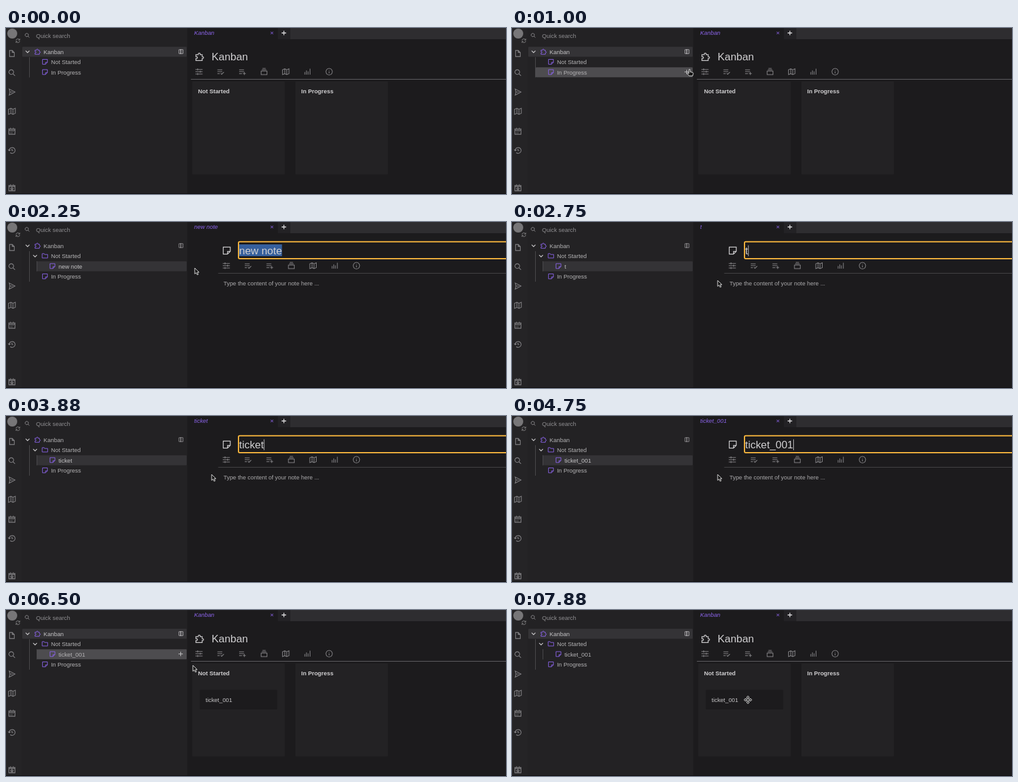
An HTML page for the animation above (8000 ms loop, 800 by 267 pixels).

```html
<!DOCTYPE html>
<html lang="en">
<head>
<meta charset="utf-8">
<title>Kanban notes</title>
<style>
  html, body { margin: 0; width: 100%; height: 100%; overflow: hidden; background: #1c1b1d; }
  svg { display: block; width: 800px; height: 267px; }
  text { font-family: "Liberation Sans", Arial, sans-serif; font-size: 9.4px; white-space: pre; }
</style>
</head>
<body>
<svg id="stage" viewBox="0 0 800 267"></svg>
<script>
const LOOP = 8000;
const PURPLE = '#8a63e8', DIM = '#858487', TEXT = '#b4b3b5', LIGHT = '#d0cfd1';
const PANEL = '#232224', PAGE = '#1c1b1d', ACTIVE = '#343336', HOVER = '#4d4c4f';

// Icon outlines on a 24 unit grid
const ICONS = {
  file: 'M13 3H5v18h14V9zV9h6',
  search: 'M10 3a7 7 0 1 0 .1 0zM15 15l6 6',
  send: 'M4 3l17 9-17 9 2-9zM6 12h8',
  map: 'M2 6l7-3 6 3 7-3v15l-7 3-6-3-7 3zM9 3v15M15 6v15',
  calendar: 'M3 5h18v16H3zM3 9h18M8 2v4M16 2v4M7 13h2M11 13h2M15 13h2M7 17h2M11 17h2',
  history: 'M4 12a8.7 8.7 0 1 1 3 6.5M1 9l3 4 4-3M12 7v5h4',
  star: 'M3 5h18v16H3zM3 8h18M8 2v4M16 2v4M12 11l1 2.5 3 .3-2 2 .5 2.7-2.5-1.3-2.5 1.3.5-2.7-2-2 3-.3z',
  puzzle: 'M3 7h6V5.500a2.500 2.500 0 0 1 5 0V7h5v5h1a2.500 2.500 0 0 1 0 5h-1v5H3v-5h1.500a2.500 2.500 0 0 0 0-5H3z',
  note: 'M3 3h18v11l-7 7H3zM21 14h-7v7',
  folder: 'M2 4h7l2 3h11v13H2z',
  door: 'M4 4h7v16H4zM11 2v20M11 4h9v16h-9M15 12h1',
  sliders: 'M1 5h22M1 12h22M1 19h22M8 2v6M16 9v6M8 16v6',
  check: 'M2 6h15M2 12h15M2 18h7M12 17l3 3 7-7',
  add: 'M2 6h15M2 12h15M2 18h9M18 13v9M13.500 17.500h9',
  stack: 'M3 10h18v11H3zM5 6h14M7 2h10',
  bars: 'M4 13v8M9 8v13M14 11v10M20 3v18',
  info: 'M12 2a10 10 0 1 0 .1 0zM12 11v6M12 7v1.500',
  sync: 'M4 11a8 8 0 0 1 15-3M20 3v6h-6M20 13a8 8 0 0 1-15 3M4 21v-6h6'
};

const CURSORS = {
  arrow: '<path d="M0 0V9.500L2.300 7.500 4 11 5.600 10.300 4 6.900H7z" fill="#151515" stroke="#eee" stroke-width=".9"/>',
  hand: '<path d="M-1 1Q0-.5 1 1V4.500L5 5.500Q6.200 6 6 7.500L5 11H-.5L-3.500 7.500Q-3.500 6-1 7.200Z" fill="#151515" stroke="#eee" stroke-width=".9"/>',
  move: '<path d="M0-6.500L2.300-3.700H1V-1H3.700V-2.300L6.500 0 3.700 2.300V1H1V3.700H2.300L0 6.500-2.300 3.700H-1V1H-3.700V2.300L-6.500 0-3.700-2.300V-1H-1V-3.700H-2.300Z" fill="#222" stroke="#e4e4e4" stroke-width=".9"/>'
};

// Every table row starts with the time at which it takes effect
const POINTER = [
  [0],
  [500, 440, 98, 'arrow'], [630, 405, 91, 'arrow'], [750, 362, 83, 'arrow'], [880, 318, 74, 'arrow'],
  [1000, 284, 66, 'hand'], [1130, 262, 58, 'hand'], [1250, 255, 54, 'hand'],
  [1380, 259, 53, 'hand'], [1500, 266, 53, 'hand'], [1630, 273, 53, 'hand'], [1750, 276, 53, 'hand'],
  [2250, 302, 74, 'arrow'], [2380, 329, 94, 'arrow'],
  [5500, 272, 72, 'hand'], [5630, 231, 55, 'hand'], [5750, 206, 42, 'hand'], [5880, 198, 37, 'hand'],
  [6250, 212, 44, 'hand'], [6380, 256, 70, 'hand'], [6500, 299, 89, 'arrow'], [6630, 326, 108, 'arrow'],
  [6750, 349, 125, 'arrow'], [6880, 366, 134, 'arrow'], [7000, 371, 137, 'arrow'],
  [7130, 373.5, 141.5, 'move'], [7880, 377.5, 144.5, 'move']
];
const HOVERED = [
  [0, ''], [1000, 'progress'], [1130, 'start'], [2250, ''],
  [5500, 'ticket'], [5750, 'kanban'], [6380, 'ticket'], [6630, '']
];
const TYPED = [
  [0, 'new note'], [2630, 't'], [2880, 'ti'], [3000, 'tic'], [3130, 'tick'], [3250, 'ticke'],
  [3880, 'ticket'], [4130, 'ticket_'], [4380, 'ticket_0'], [4630, 'ticket_00'], [4750, 'ticket_001']
];
const SAVED = [
  [0, 'new note'], [2630, 't'], [3880, 'ticket'], [4500, 'ticket_0'], [4750, 'ticket_001']
];

const at = (table, t) => table.filter(row => row[0] <= t).pop();
const rect = (x, y, w, h, fill, extra = '') =>
  `<rect x="${x}" y="${y}" width="${w}" height="${h}" fill="${fill}" ${extra}/>`;
const text = (x, y, s, fill = TEXT, extra = '') =>
  `<text x="${x}" y="${y}" fill="${fill}" ${extra}>${s}</text>`;
const line = (d, color, w = 1) => `<path d="${d}" fill="none" stroke="${color}" stroke-width="${w}"/>`;
const icon = (name, x, y, size, color, w = 2) =>
  `<g transform="translate(${x - size / 2} ${y - size / 2}) scale(${size / 24})">${line(ICONS[name], color, w)}</g>`;
const plus = (x, y, r, color, w) => line(`M${x - r} ${y}h${2 * r}M${x} ${y - r}v${2 * r}`, color, w);

// Advance widths in em of the characters typed
const EM = { t: .278, i: .222, c: .5, k: .5, e: .556, _: .556, 0: .556, 1: .556, n: .556, w: .722, o: .556, ' ': .278 };
const widthOf = s => [...s].reduce((sum, c) => sum + EM[c] * 16.9, 0);

function sidebar() {
  const buttons = [['file', 41], ['search', 72], ['send', 103], ['map', 134], ['calendar', 166], ['history', 197], ['star', 257]];
  return rect(0, 0, 290, 267, PANEL) + rect(0, 0, 25, 267, '#252426') +
    '<circle cx="10" cy="9" r="8" fill="#777678"/>' +
    '<circle cx="19" cy="20.500" r="5.500" fill="#252426"/>' + icon('sync', 19, 20.5, 9, '#99989a') +
    buttons.map(([name, y]) => icon(name, 9.5, y, 13, DIM)).join('') +
    icon('search', 34, 12, 9, '#aaa9ab') + text(48, 15.7, 'Quick search', '#8f8e91');
}

function tree(t, active, hovered, onAdd) {
  const open = t >= 2130;
  const rows = [
    ['kanban', 'Kanban', 0, 'puzzle', true],
    ['start', 'Not Started', 1, open ? 'folder' : 'note', open]
  ];
  if (open) rows.push(['ticket', at(SAVED, t)[1], 2, 'note', false]);
  rows.push(['progress', 'In Progress', 1, 'note', false]);

  let out = '';
  rows.forEach(([id, label, level, glyph, expanded], i) => {
    const left = 26 + 12 * level, y = 38.2 + 16.5 * i;
    const hot = id === hovered;
    if (hot || id === active) out += rect(left, y - 8, 289 - left, 16, hot ? HOVER : ACTIVE, 'rx="1"');
    if (expanded) out += line(`M${left + 5.500} ${y - 1.5}l3 3 3-3`, LIGHT, 1.2);
    out += icon(glyph, left + 24.3, y - .3, 10.5, PURPLE, 2.2);
    out += text(left + 34, y + 3.4, label, id === active ? '#c4c3c5' : TEXT);
    if (hot && id !== 'kanban') {
      if (onAdd) out += rect(273.5, y - 6.5, 12, 12, 'none', 'rx="2" stroke="#929194"');
      out += plus(279.5, y - .5, 3.5, '#c5c4c6', 1);
    }
  });
  return out + icon('door', 280, 38, 9.5, active === 'kanban' ? '#cfced0' : '#a3a2a4') +
    line(`M37.500 47V${open ? 96 : 79.5}` + (open ? 'M49.500 63V79.500' : ''), '#4b4a4d');
}

function tabs(label) {
  return rect(290, 0, 510, 267, PAGE) + rect(455, 0, 345, 18, '#2e2d30') + rect(435, 0, 20, 18, '#232225') +
    text(301, 10.8, label, PURPLE, 'font-style="italic"') +
    line('M423.500 6l4 4m0-4l-4 4', PURPLE, 1) + plus(444.6, 8, 3.6, '#dedddf', 1.3);
}

function header(x, glyph, ruleColor) {
  const names = ['sliders', 'check', 'add', 'stack', 'map', 'bars', 'info'];
  return icon(glyph, x + .7, 46, 15, LIGHT, 2) +
    names.map((name, i) => icon(name, x + 34.7 * i, 70.3, 12.5, DIM)).join('') +
    line(`M${x - 13} 82.500H800`, ruleColor);
}

const title = (x, s) => text(x, 51.7, s, LIGHT, 'style="font-size:16.9px"');

function board(card) {
  const column = (x, name) => rect(x, 86, 148, 149.5, PANEL, 'rx="1"') +
    text(x + 9.3, 104.6, name, '#cfced0', 'font-weight="bold"');
  return tabs('Kanban') + header(308.8, 'puzzle', '#626164') + title(329, 'Kanban') +
    column(298, 'Not Started') + column(463, 'In Progress') +
    (card ? rect(310, 128.5, 124, 31.5, PAGE, 'rx="1"') + text(319.3, 148, 'ticket_001', '#c4c3c5') : '');
}

function editor(t) {
  const name = at(TYPED, t)[1], w = widthOf(name);
  let out = tabs(at(SAVED, t)[1]) + header(352.5, 'note', '#454447');
  if (t < 5130) {
    out += rect(372, 31.8, 440, 27.2, PAGE, 'rx="2" stroke="#f3b33d" stroke-width="2"');
    if (t < 2630) out += rect(373, 36, w, 19, '#355f9d');
    else out += line(`M${373.5 + w} 37.500V55`, '#cfced0', .9);
  }
  out += title(373, name) + text(348, 101.7, 'Type the content of your note here ...', '#aaa9ab');
  if (t >= 5130) {
    for (let i = 0; i < 6; i++) out += rect(337 + 4 * (i % 2), 94 + 3.7 * (i >> 1), 2, 2, '#a9a8aa');
    out += line('M347.500 93.500V104', '#b5b4b6', .9);
  }
  return out;
}

function scene(t) {
  const editing = t >= 2250 && t < 6250;
  const active = editing ? 'ticket' : 'kanban';
  const [, x, y, shape] = at(POINTER, t);
  return sidebar() + tree(t, active, at(HOVERED, t)[1], t >= 1630 && t < 2250) +
    (editing ? editor(t) : board(t >= 6250)) +
    rect(0, 266, 800, 1, '#0d0d0e') +
    (shape ? `<g transform="translate(${x} ${y})">${CURSORS[shape]}</g>` : '');
}

const stage = document.getElementById('stage');
const start = performance.now();
let shown = '';
function draw() {
  const next = scene((performance.now() - start) % LOOP);
  if (next !== shown) stage.innerHTML = shown = next;
  requestAnimationFrame(draw);
}
draw();
</script>
</body>
</html>
```
